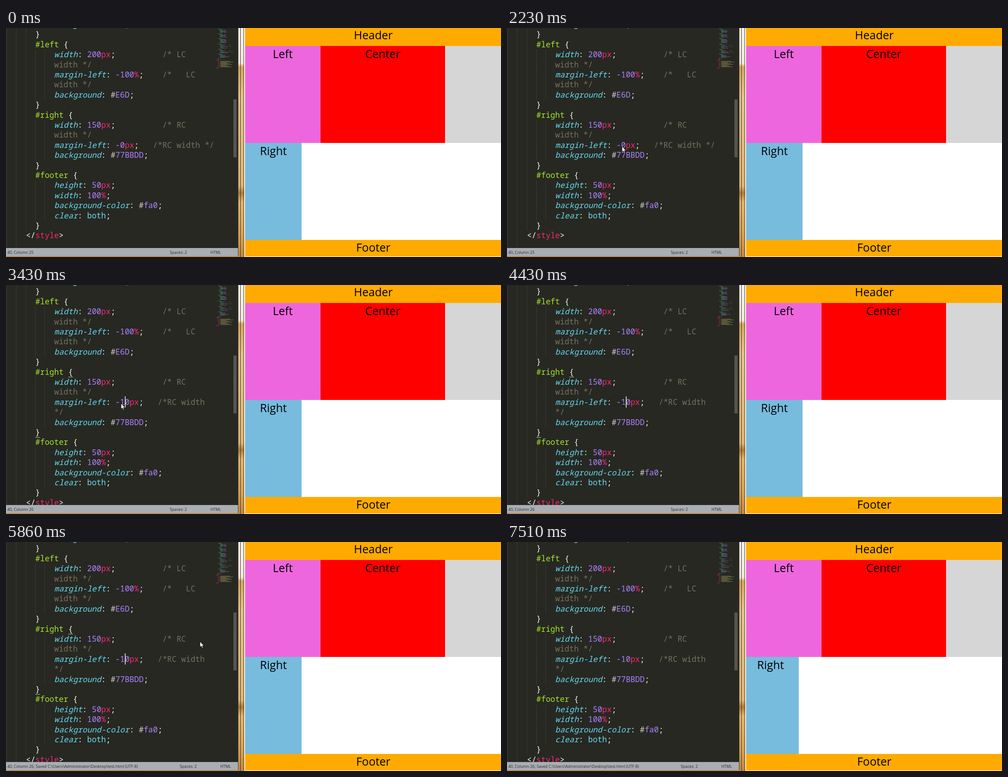
These frames come from a looping animation (1097 by 510 pixels, 8000 ms). An HTML page with a canvas:

```html
<!DOCTYPE html>
<html lang="en">
<head>
<meta charset="utf-8">
<title>Column layout demo</title>
<style>
html, body { margin: 0; width: 100%; height: 100%; overflow: hidden; background: #fff; }
canvas { display: block; }
</style>
</head>
<body>
<canvas id="stage" width="1097" height="510"></canvas>
<script>
const ctx = document.getElementById('stage').getContext('2d');
const LOOP = 8000;
const MONO = '500 17.38px "Noto Sans Mono", monospace';
const UI = '"Open Sans", "Noto Sans", sans-serif';
const CHAR = 10.43, LINE = 22.4, LEFT = 44.2, BASE = 20.3;
const COLOR = {
  bg: '#272822', plain: '#f8f8f2', comment: '#75715e', green: '#a6e22e',
  cyan: '#66d9ef', purple: '#ae81ff', pink: '#f92672', hash: '#cfcfc2'
};

// Event times in ms
const FOCUS = 2620, TYPE = 3430, IBEAM = 4230, SAVE = 5030, BLUR = 7090, RELOAD = 7510;
const CARET_ON = [[2620, 3030], [3430, 3830], [4230, 5030], [5450, 6070], [6710, 7090]];

// Pointer: time, x, y; each position holds until the next
const POINTER = [
  [800, 924, 502], [1000, 782, 478], [1200, 640, 455], [1400, 498, 427],
  [1620, 390, 342], [1820, 293, 262], [2010, 266, 266], [2230, 255, 264],
  [IBEAM, 257, 265, 'ibeam'], [5670, 430, 222], [5870, 618, 152],
  [6070, 622, 88], [6270, 614, 14], [6470, 0, -50]
];

const HEAD = `      background: red;
  }
  #left {
      width: 200px;          /* LC
      ~width */
      margin-left: -100%;    /*   LC
      ~width */
      background: #E6D;
  }
  #right {
      width: 150px;          /* RC
      ~width */`;
const MARGIN = {
  before: '\n      margin-left: -0px;   /*RC width */',
  after: '\n      margin-left: -10px;   /*RC width\n      ~*/'
};
const TAIL = `
      background: #77BBDD;
  }
  #footer {
      height: 50px;
      width: 100%;
      background-color: #fa0;
      clear: both;
  }
</style>`;

const TOKEN = /(?<comment>\/\*.*|^~.*)|(?<green>^#\w+)|(?<prop>^[\w-]+(?=:))|(?<purple>(?<=#)\w+|-?\d+)|(?<hash>#)|(?<pink>px|%|style)|(?<cyan>both|red)|(?<plain>[^\s\w]+?)/g;

function parse(source) {
  return source.split('\n').map(line => {
    const indent = line.search(/\S/);
    return {
      indent,
      tokens: [...line.trim().matchAll(TOKEN)].map(m => {
        const kind = Object.keys(m.groups).find(k => m.groups[k]);
        return {
          col: indent + m.index,
          text: m[0].replace('~', ''),
          italic: kind === 'prop',
          color: COLOR[kind === 'prop' ? 'cyan' : kind]
        };
      })
    };
  });
}
const CODE = {
  before: parse(HEAD + MARGIN.before + TAIL),
  after: parse(HEAD + MARGIN.after + TAIL)
};

function rect(color, x, y, w, h) {
  ctx.fillStyle = color;
  ctx.fillRect(x, y, w, h);
}

function label(text, x, y, font, color = '#000', align = 'left') {
  ctx.font = font;
  ctx.fillStyle = color;
  ctx.textAlign = align;
  ctx.fillText(text, x, y);
}

const baseline = row => BASE + row * LINE;
const colX = col => LEFT + col * CHAR;

function drawCode(lines, focused) {
  const guide = '#3a3b34';
  rect(guide, 1, 0, 1, 490);
  rect(guide, 22, 0, 1, 490);
  lines.forEach((line, i) => {
    const y = baseline(i - 1);
    if (line.indent >= 2) rect(guide, 44, y - 17, 1, LINE);
    if (line.indent >= 6) {
      rect(guide, 65, y - 17, 1, LINE);
      rect(guide, 85, y - 17, 1, LINE);
    }
    for (const t of line.tokens)
      label(t.text, colX(t.col), y, (t.italic ? 'italic ' : '') + MONO, t.color);
  });
  if (focused) {
    const closeRow = lines === CODE.after ? 14 : 13;
    rect('#c9c9c0', colX(9), baseline(8) + 5, CHAR, 1);
    rect('#c9c9c0', colX(2), baseline(closeRow) + 5, CHAR, 1);
  }
}

function drawMinimap(lines, hovered) {
  const x0 = 466, top = 32, pitch = 1.74, scale = 0.85;
  const bar = (color, col, len, y) => rect(color, x0 + col * scale, y, len * scale, 1);
  if (hovered) rect('#40413a', 467, 32, 34, 38);
  ctx.globalAlpha = 0.45;
  for (let i = 1; i < 19; i++) {
    const y = top - i * pitch;
    if (i % 6 === 5) bar(COLOR.green, 6, 8, y);
    else if (i % 6 === 0) bar(COLOR.plain, 6, 1, y);
    else {
      bar(COLOR.cyan, 10, 6 + i * 5 % 8, y);
      bar(COLOR.purple, 19 + i % 4, 4 + i % 3, y);
    }
  }
  lines.forEach((line, i) => {
    for (const t of line.tokens) bar(t.color, t.col + 4, t.text.length, top + i * pitch);
  });
  const bodyTop = top + lines.length * pitch;
  for (let i = 0; i < 12; i++) {
    const y = bodyTop + i * pitch, edge = i < 2 || i > 9;
    const col = edge ? 0 : 4 + i % 2;
    bar(COLOR.pink, col, edge ? 6 : 4, y);
    if (!edge) bar('#e6db74', col + 6, 12 + i * 7 % 23, y);
  }
  ctx.globalAlpha = 1;
}

function drawStatus(t) {
  rect('#a9aeb3', 0, 490, 514, 18);
  const font = '8.7px ' + UI, ink = '#292b2d';
  ctx.font = font;
  const saved = t >= SAVE;
  const where = `Line 40, Column ${t < TYPE ? 25 : 26}`;
  const note = saved ? '; Saved C:\\Users\\Administrator\\Desktop\\test.html (UTF-8)' : '';
  label(where + note, 3 - ctx.measureText('Line ').width, 502.5, font, ink);
  label('Spaces: 2', saved ? 385 : 363, 502.5, font, ink);
  label('HTML', saved ? 475 : 453, 502.5, font, ink);
}

function drawDesktop() {
  const wood = ctx.createLinearGradient(0, 0, 0, 510);
  [[0, '#f6f3ee'], [0.155, '#f1ebe1'], [0.17, '#d7a760'], [0.3, '#e5c48f'],
   [0.69, '#e0b877'], [0.72, '#b27b38'], [0.76, '#e3b873'], [0.9, '#d9a657'],
   [1, '#c18a41']].forEach(([p, c]) => wood.addColorStop(p, c));
  rect(wood, 0, 0, 530, 510);
  rect('#4a3c2c', 514, 0, 1, 508);
  rect('#3a2c1e', 519, 0, 1, 510);
  rect('#5a4630', 526, 0, 1, 510);
  rect('#eee9e2', 528, 0, 2, 510);
}

function drawEditor(t) {
  const lines = t < TYPE ? CODE.before : CODE.after;
  ctx.save();
  ctx.beginPath();
  ctx.rect(0, 0, 514, 490);
  ctx.clip();
  rect(COLOR.bg, 0, 0, 514, 490);
  drawCode(lines, t >= FOCUS && t < BLUR);
  drawMinimap(lines, t >= 1400 && t < 1620);
  rect('#55564f', 504, t < TYPE ? 159 : 157, 7, 129);
  if (CARET_ON.some(([a, b]) => t >= a && t < b))
    rect(COLOR.plain, t < TYPE ? 253.5 : 263.5, 248, 1.5, 25);
  ctx.restore();
  drawStatus(t);
}

function drawPage(t) {
  const font = '25px ' + UI;
  const shift = t < RELOAD ? 0 : 8.4;
  const block = (color, x, y, w, h, text, cx, base) => {
    rect(color, x, y, w, h);
    if (text) label(text, cx, base, font, '#000', 'center');
  };
  rect('#fff', 530, 0, 567, 510);
  block('#fa0', 530, 0, 567, 40, 'Header', 814, 25);
  block('#d6d6d6', 973, 40, 124, 216);
  block('#f00', 696.5, 40, 276.5, 216, 'Center', 835, 66.5);
  block('#e6d', 530, 40, 166.5, 216, 'Left', 613.5, 66.5);
  block('#7bd', 530, 256, 125 - shift, 216, 'Right', 592.5 - shift, 282.5);
  block('#fa0', 530, 472, 567, 37, 'Footer', 814, 498);
}

function drawPointer(t) {
  const now = POINTER.filter(p => t >= p[0]).pop();
  if (!now) return;
  const [, x, y, shape] = now;
  if (shape === 'ibeam') {
    rect('#0b0b0a', x - 0.5, y - 4, 1, 10);
    rect('#0b0b0a', x - 2.5, y - 4, 5, 1);
    rect('#0b0b0a', x - 2.5, y + 5, 5, 1);
    return;
  }
  ctx.beginPath();
  [[0, 0], [0, 12], [2.8, 9.6], [4.8, 14], [6.7, 13.2], [4.8, 9], [8.6, 9]]
    .forEach(([dx, dy]) => ctx.lineTo(x + dx, y + dy));
  ctx.closePath();
  ctx.fillStyle = '#fff';
  ctx.fill();
  ctx.strokeStyle = '#111';
  ctx.lineWidth = 0.8;
  ctx.stroke();
}

const start = performance.now();
function frame() {
  const t = (performance.now() - start) % LOOP;
  drawDesktop();
  drawEditor(t);
  drawPage(t);
  drawPointer(t);
  requestAnimationFrame(frame);
}
frame();
</script>
</body>
</html>
```
